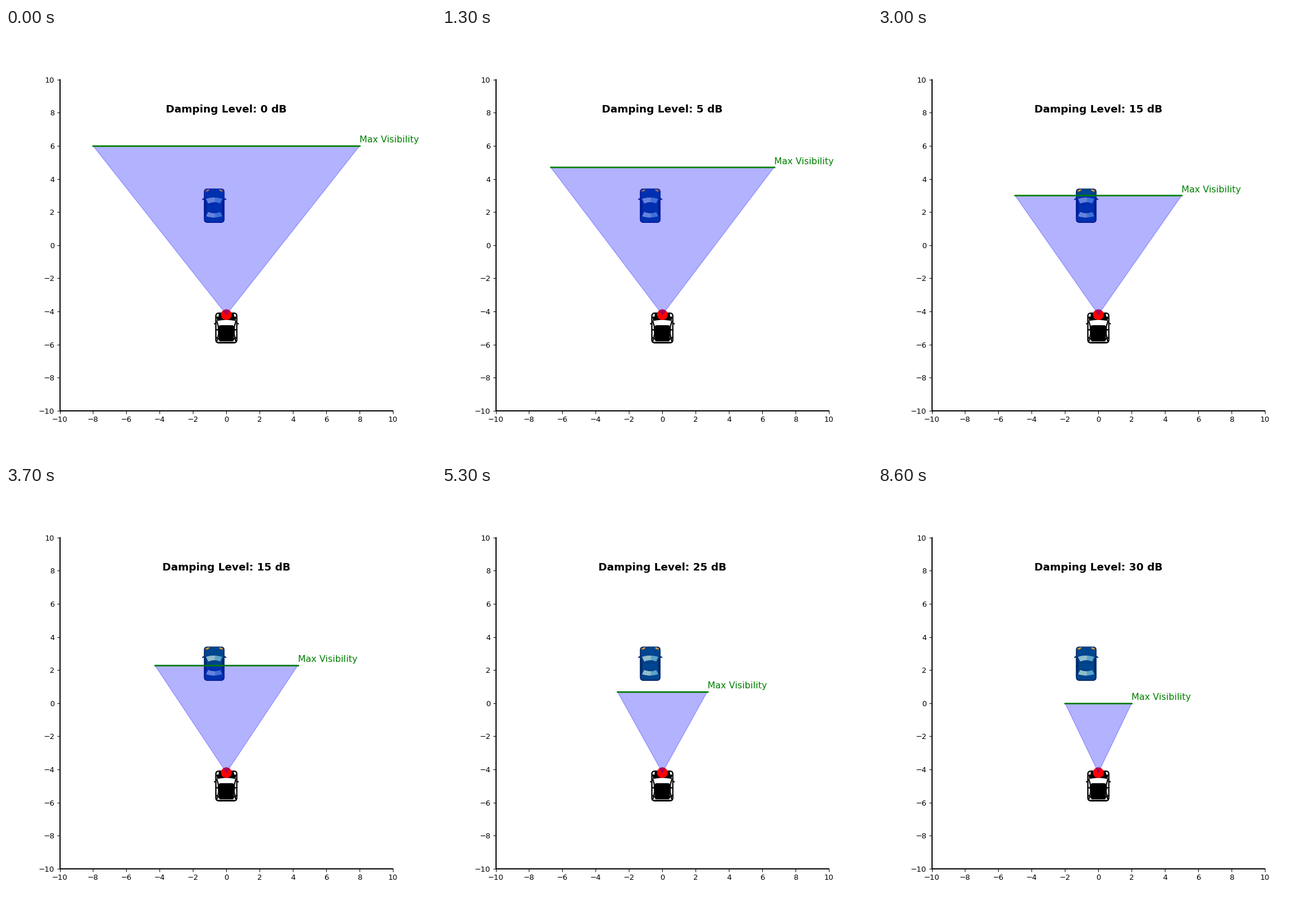
A matplotlib script that plays this animation: 748 px wide and 748 px high, repeating every 9000 ms.

```python
import numpy as np
import matplotlib.pyplot as plt
from matplotlib.animation import FuncAnimation
from matplotlib.patches import Circle, Ellipse, FancyBboxPatch, Polygon
from matplotlib.transforms import Affine2D

SIZE = 748
FRAMES, INTERVAL = 90, 100
SHRINK_FRAMES = 60
SENSOR = (0, -4.2)

plt.rcParams["font.family"] = "DejaVu Sans"
fig, ax = plt.subplots(figsize=(8, 8), dpi=SIZE / 8)
ax.set(xlim=(-10, 10), ylim=(-10, 10))
ax.set_xticks(range(-10, 11, 2))
ax.set_yticks(range(-10, 11, 2))
ax.spines[["top", "right"]].set_visible(False)
ax.spines[["left", "bottom"]].set_linewidth(1.5)

# Cars are drawn in stage pixels, with y pointing down.
stage = Affine2D().scale(1, -1).translate(0, SIZE)


def add(patch):
    patch.set_transform(stage)
    patch.set_zorder(0.5)
    ax.add_patch(patch)


def shape(points, color):
    add(Polygon(points, fc=color, lw=0))


def box(x0, y0, x1, y1, radius, color, edge="none", lw=0):
    style = f"round,pad=0,rounding_size={radius}"
    add(FancyBboxPatch((x0, y0), x1 - x0, y1 - y0, boxstyle=style,
                       fc=color, ec=edge, lw=lw))


def stroke(points, color, lw):
    x, y = zip(*points)
    ax.plot(x, y, color=color, lw=lw, transform=stage, zorder=0.6)


def window(cx, wide_y, narrow_y, wide, narrow, bulge, color, span=(-1, 1)):
    """Car glass: two bowed edges of different half-widths."""
    u = np.linspace(*span, 20)
    bow = bulge * (1 - u ** 2)
    outer = np.column_stack([cx + wide * u, wide_y + bow])
    inner = np.column_stack([cx + narrow * u, narrow_y + bow])
    shape(np.vstack([outer, inner[::-1]]), color)


def blue_car(cx=362.2):
    navy, paint = "#06296b", "#00458f"
    for side in (-1, 1):
        shape([(cx + side * x, y) for x, y in
               ((16, 294.5), (21, 297.5), (21, 299.3), (16, 298))], navy)
    box(cx - 18, 279.3, cx + 18, 338.8, 6, navy)
    box(cx - 16.2, 280.2, cx + 16.2, 337, 5, paint)
    for side in (-1, 1):
        shape([(cx + side * x, y) for x, y in
               ((17.4, 297), (14.3, 300), (13.2, 312), (14.3, 326),
                (17.4, 331))], navy)
        add(Ellipse((cx + side * 11.8, 282.7), 7.5, 3.2,
                    angle=side * 22, fc="#e0a23c", ec="#4a4a50", lw=0.5))
    for wide_y, narrow_y, bulge in ((297.3, 305.3, -2.3), (327.3, 320, 2.3)):
        window(cx, wide_y, narrow_y, 14, 10.3, bulge, "#5ba3c9")
        window(cx, wide_y, narrow_y, 14, 10.3, bulge, "#93bccb", (-1, 0.1))
    stroke([(cx - 10, 307), (cx + 10, 307)], "#023a7c", 0.8)
    stroke([(cx - 10, 318.5), (cx + 10, 318.5)], "#023a7c", 0.8)
    stroke([(cx - 13, 337.6), (cx + 13, 337.6)], navy, 1.2)


def black_car(cx=383.3):
    for side in (-1, 1):
        shape([(cx + side * x, y) for x, y in
               ((17, 512.5), (21.5, 513.5), (21.5, 515.8), (17, 515))],
              "black")
    box(cx - 18.2, 496, cx + 18.2, 547.6, 5, "white", "black", 1.7)
    box(cx - 13.5, 495, cx + 13.5, 511, 5, "black")
    shape([(cx - 17.5, 502), (cx + 17.5, 502),
           (cx + 15.5, 510.5), (cx - 15.5, 510.5)], "black")
    window(cx, 509.7, 518, 16, 12, -1.8, "white")
    box(cx - 13.2, 517, cx + 13.2, 545, 3, "black")
    for side in (-1, 1):
        stroke([(cx + side * x, y) for x, y in
                ((16.5, 510), (14, 519), (13.5, 532), (16, 544))],
               "black", 1.6)
        stroke([(cx + side * 18, 525), (cx + side * 13, 525)], "black", 1.8)
        stroke([(cx + side * 18, 538), (cx + side * 13, 541)], "black", 1.6)
    stroke([(cx - 14, 547.4), (cx + 14, 547.4)], "black", 1.8)


blue_car()
black_car()

ax.add_patch(Circle(SENSOR, 0.3, color="red"))
beam = ax.add_patch(Polygon([SENSOR] * 3, color="blue", alpha=0.3))
limit, = ax.plot([], [], color="green", lw=2)
limit_label = ax.text(0, 0, "Max Visibility", color="green", fontsize=12)
title = ax.text(0, 8, "", fontsize=14, weight="bold", ha="center")


def update(frame):
    step = min(frame, SHRINK_FRAMES)
    half, y = 8 - step / 10, 6 - step / 10
    beam.set_xy([SENSOR, (-half, y), (half, y)])
    limit.set_data([-half, half], [y, y])
    limit_label.set_position((half, y + 0.2))
    title.set_text(f"Damping Level: {step // 10 * 5} dB")
    return beam, limit, limit_label, title


animation = FuncAnimation(fig, update, frames=FRAMES, interval=INTERVAL,
                          repeat=True, repeat_delay=0)
plt.show()
```
